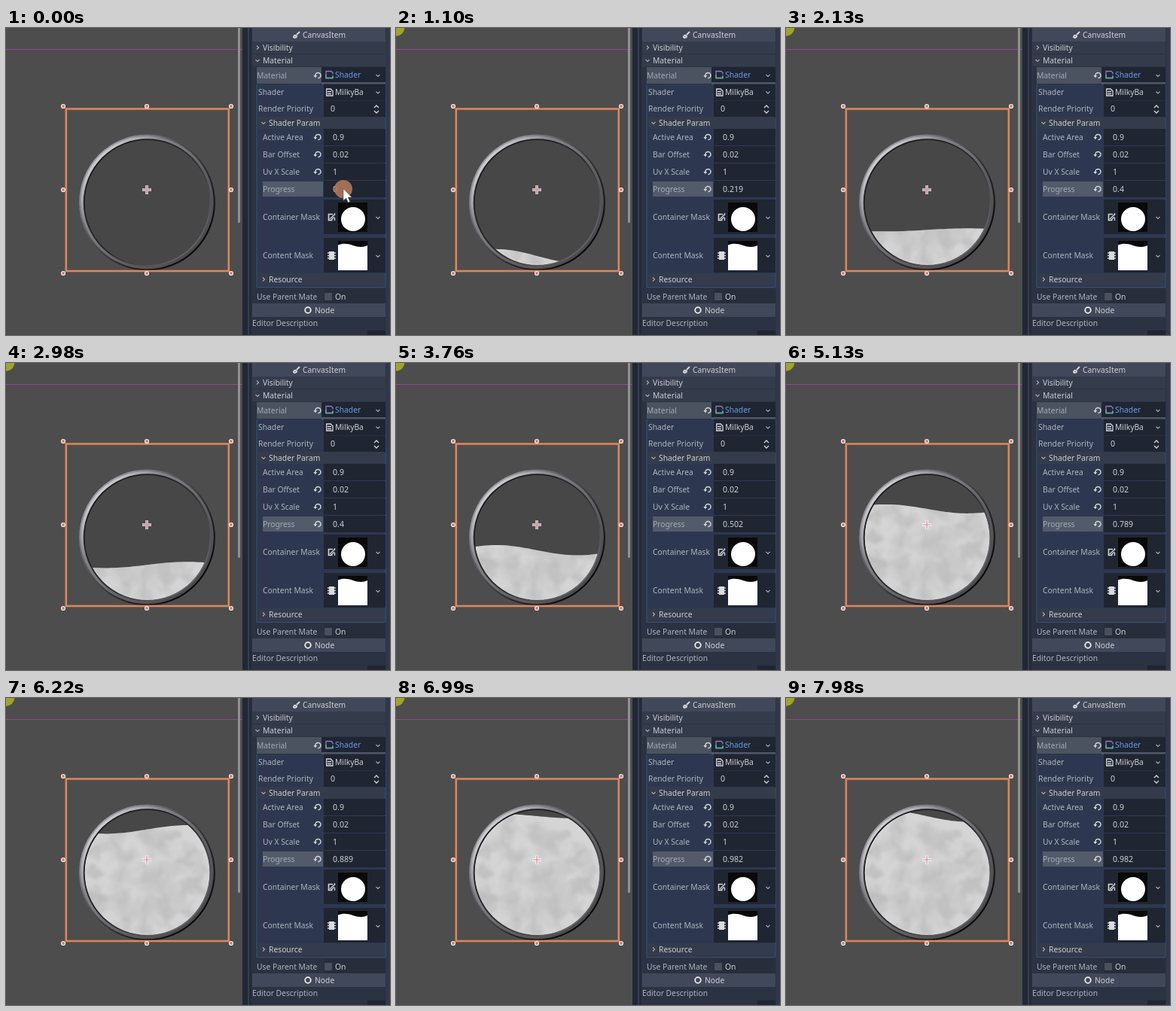
An HTML page that plays this animation: 510 px wide and 408 px high, repeating every 8000 ms.

```html
<!DOCTYPE html>
<html lang="en">
<head>
<meta charset="utf-8">
<title>Liquid shader progress</title>
<style>
  html, body { margin: 0; width: 100%; height: 100%; overflow: hidden; background: #4d4d4d; }
  svg { display: block; width: 510px; height: 408px; }
  text { font: 10.3px "Noto Sans", sans-serif; fill: #cdcfd3; white-space: pre; }
  .value { font-size: 10.6px; }
  .name { fill: #afb4be; }
  .dim { fill: #a5aab4; }
  .link { fill: #699ce8; }
  .line { fill: none; stroke: #d4d6da; stroke-width: 1.3; }
  .chevron { fill: none; stroke: #a4a9b3; stroke-width: 1.2; }
</style>
</head>
<body>
<svg viewBox="0 0 510 408">
  <defs>
    <linearGradient id="rim" x1=".12" y1=".15" x2=".88" y2=".85">
      <stop offset="0" stop-color="#a2a2a6"/><stop offset=".35" stop-color="#55555a"/>
      <stop offset=".65" stop-color="#2c2c2e"/><stop offset="1" stop-color="#060606"/>
    </linearGradient>
    <linearGradient id="metal" x1=".12" y1=".15" x2=".88" y2=".85">
      <stop offset="0" stop-color="#d0d0d4"/><stop offset=".25" stop-color="#85858a"/>
      <stop offset=".65" stop-color="#606064"/><stop offset="1" stop-color="#4a4a4e"/>
    </linearGradient>
    <linearGradient id="lip" x1=".12" y1=".15" x2=".88" y2=".85">
      <stop offset="0" stop-color="#161618"/><stop offset=".55" stop-color="#2a2a2c"/>
      <stop offset="1" stop-color="#68686b"/>
    </linearGradient>
    <radialGradient id="puff">
      <stop offset="0" stop-color="#a8a8a8" stop-opacity=".5"/>
      <stop offset=".5" stop-color="#acacac" stop-opacity=".28"/>
      <stop offset="1" stop-color="#b4b4b4" stop-opacity="0"/>
    </radialGradient>
    <filter id="billow">
      <feTurbulence type="fractalNoise" baseFrequency=".06" numOctaves="2" seed="4"/>
      <feDisplacementMap in="SourceGraphic" scale="32" xChannelSelector="R" yChannelSelector="G"/>
      <feGaussianBlur stdDeviation="1.6"/>
    </filter>
    <clipPath id="bowl"><circle cx="187.5" cy="232" r="83.3"/></clipPath>
    <clipPath id="surface"><path id="liquid"/></clipPath>
  </defs>
  <g id="viewport"></g>
  <g id="panel"></g>
  <g id="pressed">
    <circle cx="448" cy="214" r="12" fill="#b57a57" opacity=".88"/>
    <path d="M448 213.5v16l3.7-3.4 2.6 5.9 2.6-1.2-2.6-5.7h5z" fill="#fff" stroke="#333" stroke-width=".5"/>
  </g>
  <circle id="idle" cx="0" cy="-1" r="11.5" fill="#a3a229"/>
</svg>
<script>
const $ = id => document.getElementById(id);
const rect = (x, y, w, h, fill, more = '') =>
  `<rect x="${x}" y="${y}" width="${w}" height="${h}" fill="${fill}" ${more}/>`;
const circle = (x, y, r, fill, more = '') =>
  `<circle cx="${x}" cy="${y}" r="${r}" fill="${fill}" ${more}/>`;
const line = (d, more = '') => `<path class="line" d="${d}" ${more}/>`;
const label = (x, y, s, type = '', id = '') =>
  `<text x="${x}" y="${y + 3.8}" class="${type}" id="${id}">${s}</text>`;
const chevronDown = (x, y) => `<path class="chevron" d="M${x - 2.5} ${y - 1}l2.5 2.5 2.5-2.5"/>`;
const chevronRight = (x, y) => `<path class="chevron" d="M${x - 1} ${y - 2.5}l2.5 2.5-2.5 2.5"/>`;
const reset = (y, id = '') => `<g id="${id}">` +
  line(`M410.800 ${y}a3.600 3.600 0 1 1 3.600 3.600`, 'style="stroke-width:1.5"') +
  `<path d="M408.400 ${y}h4.800l-2.400 3.200z" fill="#d4d6da"/></g>`;
const field = (y, h = 22) => rect(422, y - h / 2, 82, h, '#202532');

// Viewport: gauge, selection frame and handles
const puffs = [[118, 202, 10], [143, 196, 13], [160, 211, 11], [203, 191, 15], [224, 183, 10],
  [246, 206, 10], [231, 219, 12], [185, 239, 13], [207, 237, 13], [154, 239, 12], [118, 231, 9],
  [116, 263, 12], [131, 270, 13], [156, 267, 10], [183, 279, 12], [209, 267, 15], [237, 258, 11],
  [251, 246, 10], [158, 291, 12], [215, 289, 12], [239, 281, 9], [186, 301, 11], [181, 178, 11],
  [151, 172, 10], [258, 226, 9]];
const ring = (r, width, paint) => circle(187.5, 232, r, 'none', `stroke="url(#${paint})" stroke-width="${width}"`);
const handles = [76, 187, 299].flatMap(x => [104, 215, 326].map(y => [x, y]))
  .filter(([x, y]) => x !== 187 || y !== 215);

$('viewport').innerHTML =
  rect(0, 0, 314, 408, '#4d4d4d') +
  rect(0, 28, 314, 1, '#9b429a') +
  rect(308, -5, 3, 264, '#919191', 'rx="1.5"') +
  circle(187.5, 232, 85, '#474747') +
  `<g clip-path="url(#bowl)"><g clip-path="url(#surface)">${rect(100, 140, 176, 180, '#d5d5d5')}` +
  '<g filter="url(#billow)">' +
  puffs.map(([x, y, r]) => circle(x, y, r * 1.7, 'url(#puff)')).join('') + '</g></g></g>' +
  ring(84.1, 2.2, 'lip') + ring(89, 2.8, 'rim') + ring(86.5, 3.6, 'metal') +
  rect(79.8, 107.5, 216, 215.500, 'none', 'stroke="#dc865b" stroke-width="2.6"') +
  handles.map(([x, y]) => circle(x, y, 2.5, '#d67a70', 'stroke="#eee" stroke-width="1.2"')).join('') +
  '<path d="M181 215h12M187 209v12" stroke="#fff" stroke-opacity=".65" stroke-width="4"/>' +
  '<path d="M181.5 215h11M187 209.5v11" stroke="#df8d8a" stroke-width="1.2"/>';

// Inspector
const numberRow = (y, name, value) =>
  label(341, y, name, 'name') + reset(y) + field(y) + label(434, y, value, 'value');
const section = (x, y, name, open, width) => rect(x, y - 8, width, 16, '#343b4b') +
  (open ? chevronDown : chevronRight)(x + 7, y) + label(x + 14, y, name);
const category = (y, name, x) => rect(327, y - 9, 177, 18, '#414859') + label(x, y, name);
const sheet = (x, y) => line(`M${x + .7} ${y - 4.5}h5.500l2.800 2.800v6.200h-8.300z`) +
  line(`M${x + 2} ${y - 1}h5M${x + 2} ${y + 2}h5`);

$('panel').innerHTML =
  rect(314, 0, 196, 408, '#2b3242') + rect(314, 0, 7, 408, '#222735') +
  rect(321, 0, 2, 408, '#343d51') + rect(323, 0, 3, 408, '#242a39') +
  rect(505, 0, 5, 408, '#30384a') +
  category(9, 'CanvasItem', 394) +
  line('M382 13q0-4 3-3l1 1q0 2-4 2M386 9l4-4', 'style="stroke-width:2"') +
  section(327, 26, 'Visibility', false, 177) + section(327, 43, 'Material', true, 177) +
  rect(333, 52, 86, 22, '#4b5260') + label(333, 63, 'Material', 'dim') + reset(63) +
  rect(419, 52, 85, 21, '#202532') + rect(419, 72, 85, 3, '#505868') +
  line('M427 57.5h-2v9h9v-3M427 57.5h5l2 2v2', 'style="stroke:#8a79c4"') +
  line('M425 62v4.5h9v-3', 'style="stroke:#57b59a"') +
  label(437, 62, 'Shader', 'link') + chevronDown(494, 63) +
  rect(333, 75, 171, 270, '#2d3850') +
  line('M333 75v269.500h171v-269.500', 'style="stroke:#3a5272;stroke-width:1"') +
  label(335, 85.5, 'Shader', 'name') + field(85.5) + sheet(425, 85.5) + label(437, 85.5, 'MilkyBa') +
  chevronDown(494, 85.5) +
  label(335, 107.5, 'Render Priority', 'name') + field(108) + label(431, 107.5, '0', 'value') +
  line('M489 106l3-3 3 3M489 110l3 3 3-3') +
  section(335, 126, 'Shader Param', true, 168) +
  numberRow(145, 'Active Area', '0.9') + numberRow(168, 'Bar Offset', '0.02') +
  numberRow(191, 'Uv X Scale', '1') +
  rect(341, 204, 80, 20, '#535b6b') + label(341, 214, 'Progress', 'dim') +
  reset(214, 'progressReset') + field(214) + label(434, 214, '0', 'value', 'progress') +
  label(341, 251, 'Container Mask', 'name') + field(251, 46) +
  line('M434 247.500h-5.500v8h5', 'style="stroke-width:1.6"') + line('M430 254l6-6M432 255l4-4') +
  line('M436.500 246v3M436.500 252v4') +
  rect(441, 232, 39, 39, '#090909') + circle(461, 254, 16, '#fff') + chevronDown(494, 252) +
  label(341, 302, 'Content Mask', 'name') + field(302, 46) +
  rect(429, 297, 7, 11, '#dedede') + line('M427 299h11M427 302.5h11M427 306h11') +
  rect(441, 283, 39, 39, '#090909') +
  '<path d="M441 288.500c6-2.500 13-2 20 .5s14 2.500 19 0v33h-39z" fill="#fff"/>' + chevronDown(494, 303) +
  section(335, 334, 'Resource', false, 168) +
  label(333, 357, 'Use Parent Mate', 'name') + rect(422, 347, 82, 20, '#272d3b') +
  rect(423, 352, 10, 10, '#4a505e', 'rx="1"') + label(437, 357, 'On') +
  category(375, 'Node', 410) + circle(401, 375, 3.8, 'none', 'stroke="#eee" stroke-width="1.8"') +
  label(327, 392, 'Editor Description', 'name') + rect(480, 402, 24, 6, '#202532');

// [time in ms, progress], linear in between
const keys = [[0, 0], [553, 0], [1553, .4], [3505, .4], [4478, .789], [5720, .789],
  [6220, .889], [6500, .941], [6830, .982], [8000, .982]];

function progressAt(t) {
  const i = keys.findIndex(key => key[0] > t);
  const [t0, p0] = keys[i - 1], [t1, p1] = keys[i];
  return p0 + (p1 - p0) * (t - t0) / (t1 - t0);
}

function draw() {
  const t = performance.now() % 8000;
  const progress = progressAt(t);
  const level = 344.9 - 191.4 * progress;
  const slosh = 9.2 * Math.cos(4.5 * (t - 1100) / 1000 - .15);
  let d = 'M100 320';
  for (let x = 100; x <= 276; x += 4) {
    const y = level + slosh * Math.sin((x - 187) * 2 * Math.PI / 216);
    d += `L${x} ${y.toFixed(2)}`;
  }
  $('liquid').setAttribute('d', d + 'L276 320Z');
  $('progress').textContent = +progress.toFixed(3);
  $('progressReset').style.display = progress > 0 ? '' : 'none';
  $('pressed').style.display = t < 60 ? '' : 'none';
  $('idle').style.display = t < 60 ? 'none' : '';
  requestAnimationFrame(draw);
}
draw();
</script>
</body>
</html>
```
